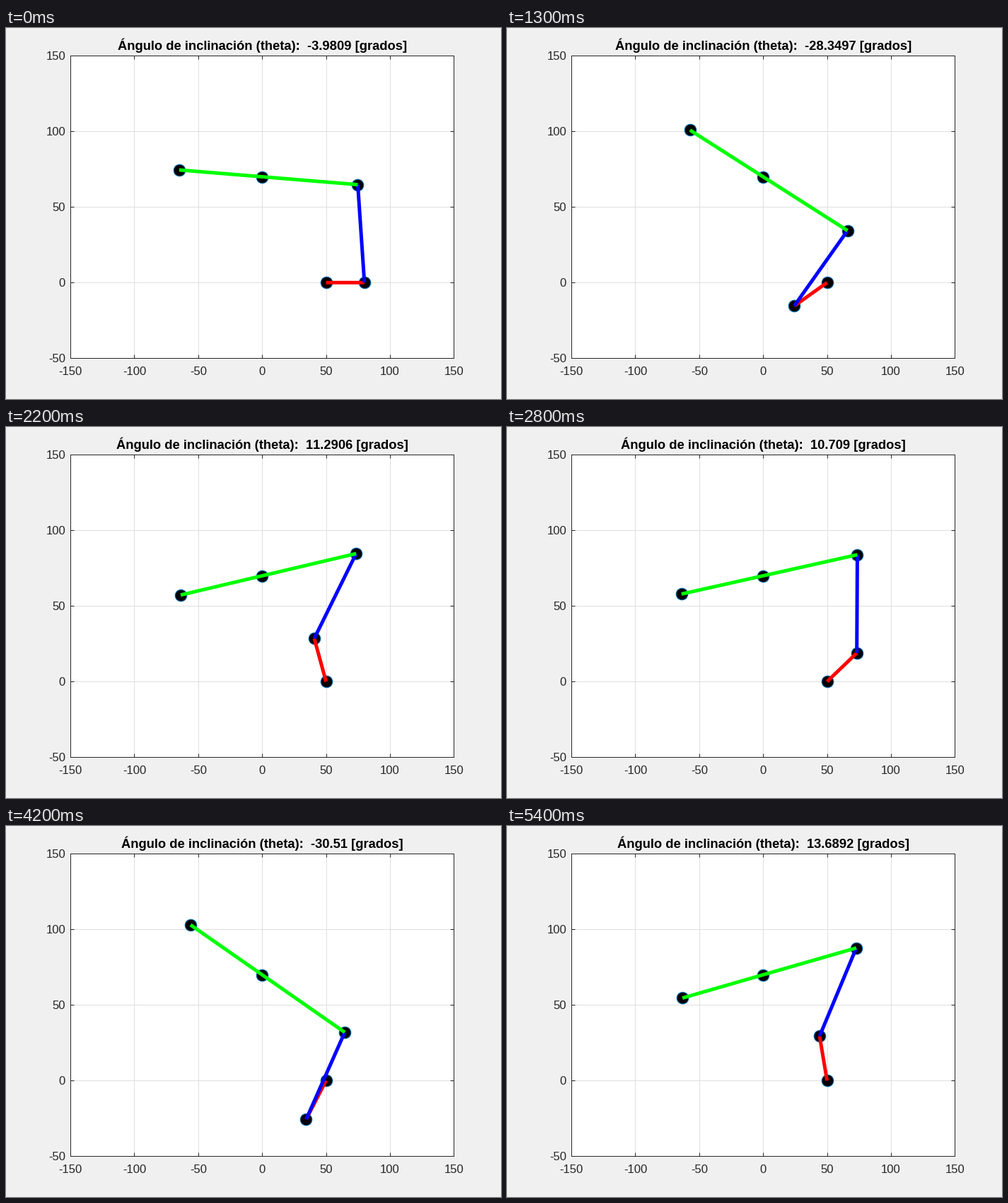
Recreate the animation shown at these times as a matplotlib script. Size 700 px wide and 525 px high, loop 5.5 s.

```python
import math

import matplotlib.pyplot as plt
from matplotlib.animation import FuncAnimation

W, H, DPI = 700, 525, 100
FRAMES, INTERVAL = 55, 100
STEP = -0.2                      # crank turn per frame, radians

CRANK_PIVOT, ROCKER_PIVOT = (50, 0), (0, 70)
CRANK, COUPLER, ROCKER, TAIL = 30, 65, 75, 65

LEFT, BOTTOM, WIDTH, HEIGHT = 91, 57.75, 542.4, 427.875
INK = "#262626"

plt.rcParams["font.family"] = "Liberation Sans"
plt.rcParams["text.kerning_factor"] = 6


def pt(px):
    return px * 72 / DPI


def label(x, y, text, size, **kw):
    """Text with its baseline at pixel (x, y), measured from the top left."""
    return fig.text(x / W, 1 - y / H, text, fontsize=pt(size),
                    va="baseline", **kw)


def polar(origin, radius, angle):
    return (origin[0] + radius * math.cos(angle),
            origin[1] + radius * math.sin(angle))


def pose(k):
    """Crank end, rocker end, rocker tail and rocker angle of the linkage."""
    crank_end = polar(CRANK_PIVOT, CRANK, STEP * k)
    dx = crank_end[0] - ROCKER_PIVOT[0]
    dy = crank_end[1] - ROCKER_PIVOT[1]
    d = math.hypot(dx, dy)
    inner = math.acos((ROCKER**2 + d**2 - COUPLER**2) / (2 * ROCKER * d))
    theta = math.atan2(dy, dx) + inner
    return (crank_end, polar(ROCKER_PIVOT, ROCKER, theta),
            polar(ROCKER_PIVOT, -TAIL, theta), theta)


def short_number(x):
    digits = max(math.floor(math.log10(abs(x))), 0) + 5
    return f"{x:.{digits}g}"


fig = plt.figure(figsize=(W / DPI, H / DPI), dpi=DPI, facecolor="#f0f0f0")
ax = fig.add_axes([LEFT / W, BOTTOM / H, WIDTH / W, HEIGHT / H])
ax.set(xlim=(-150, 150), ylim=(-50, 150),
       xticks=range(-150, 151, 50), yticks=range(-50, 151, 50))
ax.set_axisbelow(True)
ax.grid(color="#dfdfdf", linewidth=pt(1))
ax.tick_params(direction="in", length=pt(5.4), width=pt(1), color=INK,
               top=True, right=True, labelbottom=False, labelleft=False)
for spine in ax.spines.values():
    spine.set(linewidth=pt(1), edgecolor=INK)

for v in range(-150, 151, 50):
    label(LEFT + (v + 150) / 300 * WIDTH, 491, str(v), 16.67,
          ha="center", color=INK)
for v in range(-50, 151, 50):
    label(84, 473 - (v + 50) / 200 * HEIGHT, str(v), 16.67,
          ha="right", color=INK)
title = label(362.5, 31, "", 18.33, ha="center", weight="bold", color="black")

joints, = ax.plot([], [], "o", markersize=pt(16.67), markerfacecolor="black",
                  markeredgecolor="#0072bd", markeredgewidth=pt(1), zorder=3)


def bar(color):
    return ax.plot([], [], color=color, linewidth=pt(5),
                   solid_capstyle="butt", snap=False, zorder=4)[0]


crank, coupler, rocker = bar("#ff0000"), bar("#0000ff"), bar("#00ff00")


def draw(k):
    b, c, tail, theta = pose(k)
    joints.set_data(*zip(CRANK_PIVOT, b, c, ROCKER_PIVOT, tail))
    crank.set_data(*zip(CRANK_PIVOT, b))
    coupler.set_data(*zip(b, c))
    rocker.set_data(*zip(tail, c))
    title.set_text("Ángulo de inclinación (theta):  "
                   f"{short_number(math.degrees(theta))} [grados]")
    return joints, crank, coupler, rocker, title


anim = FuncAnimation(fig, draw, frames=FRAMES, interval=INTERVAL, repeat=True,
                     repeat_delay=0, blit=False)
plt.show()
```
